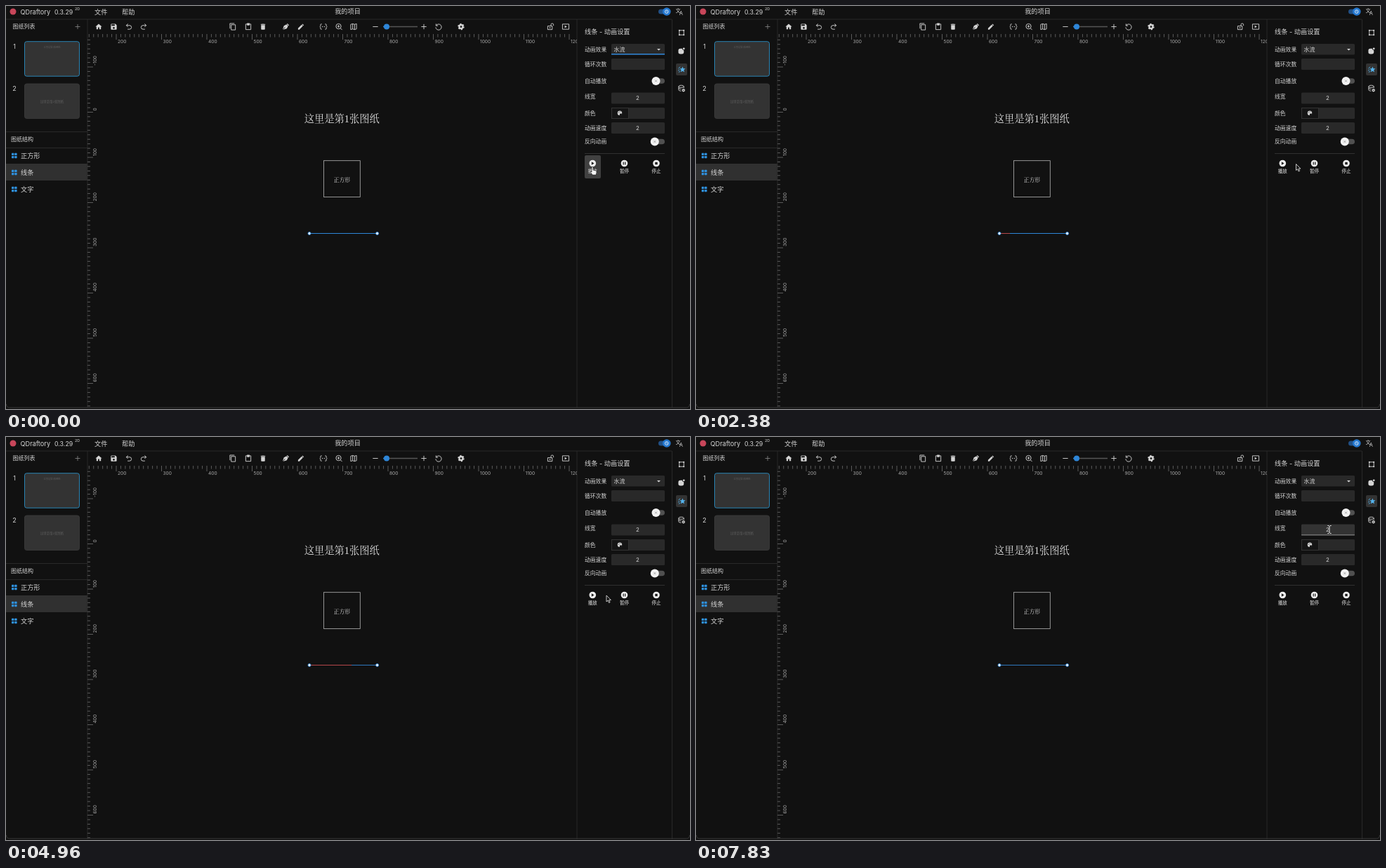
Recreate the animation shown at these times as an HTML page. Size 974 px wide and 575 px high, loop 8 s.

```html
<!DOCTYPE html>
<html lang="zh-CN">
<head>
<meta charset="utf-8">
<title>QDraftory</title>
<style>
html, body { margin: 0; width: 100%; height: 100%; overflow: hidden; background: #111; }
svg { display: block; width: 974px; height: 575px; }
text { font-family: Inter, 'Noto Sans CJK SC', 'Noto Sans CJK', sans-serif; white-space: pre; }
.serif { font-family: 'Liberation Serif', 'Noto Serif CJK SC', 'Noto Sans CJK SC', serif; font-weight: 500; }
</style>
</head>
<body>
<svg id="stage" viewBox="0 0 974 575"></svg>
<script>
const LIGHT = '#d4d4d4', BLUE = '#2e86d8', EDGE = '#292929', FIELD = '#292929';

const text = (s, x, cy, size, fill = LIGHT, anchor = 'start', extra = '') =>
  `<text x="${x}" y="${cy + size * 0.37}" font-size="${size}" fill="${fill}" text-anchor="${anchor}" ${extra}>${s}</text>`;
const rect = (x, y, w, h, fill, extra = '') =>
  `<rect x="${x}" y="${y}" width="${w}" height="${h}" fill="${fill}" ${extra}/>`;
const circle = (x, y, r, fill, extra = '') => `<circle cx="${x}" cy="${y}" r="${r}" fill="${fill}" ${extra}/>`;
const path = (d, stroke, width = 1, extra = '') =>
  `<path d="${d}" fill="none" stroke="${stroke}" stroke-width="${width}" ${extra}/>`;
const solid = (d, fill = LIGHT) => `<path d="${d}" fill="${fill}" fill-rule="evenodd"/>`;

// Icons live in a 24 unit box centred on (x, y)
const icon = (x, y, body, size = 11) =>
  `<g transform="translate(${x - size / 2} ${y - size / 2}) scale(${size / 24})">${body}</g>`;
const line = d => path(d, LIGHT, 2);

function toolbar() {
  const gear = circle(12, 12, 5.5, 'none', `stroke="${LIGHT}" stroke-width="5"`) +
    circle(12, 12, 8.6, 'none', `stroke="${LIGHT}" stroke-width="3.4" stroke-dasharray="4.5 4.5"`);
  const items = [
    [132, solid('M10 20v-6h4v6h5v-8h3L12 3 2 12h3v8z')],
    [153.5, solid('M17 3H5a2 2 0 0 0-2 2v14a2 2 0 0 0 2 2h14a2 2 0 0 0 2-2V7zM12 19a3 3 0 1 1 0-6 3 3 0 0 1 0 6zM15 9H5V5h10z')],
    [175, line('M9 3 4 8l5 5M4 8h10a6 6 0 0 1 0 12H8')],
    [196, line('M15 3l5 5-5 5M20 8H10a6 6 0 0 0 0 12h6')],
    [323, line('M3 18V2h14M7 6h13v16H7z')],
    [345, line('M4 4h16v17H4z') + solid('M8 1h8v7H8z')],
    [366, solid('M6 19a2 2 0 0 0 2 2h8a2 2 0 0 0 2-2V7H6zM19 4h-3.5l-1-1h-5l-1 1H5v2h14z')],
    [398, solid('M3 21l4-12 8-4 5 5-4 8-11 3 6-7-1-1zM16 4l2-2 5 5-2 2z')],
    [420, solid('M3 17v4h4L18 10l-4-4zM21 7l-4-4-2 2 4 4z')],
    [452, line('M7 4H5q-2 0-2 2v4l-2 2 2 2v4q0 2 2 2h2M17 4h2q2 0 2 2v4l2 2-2 2v4q0 2-2 2h-2') +
      circle(9, 12, 1.4, LIGHT) + circle(15, 12, 1.4, LIGHT)],
    [474, circle(11, 11, 8, 'none', `stroke="${LIGHT}" stroke-width="2"`) + line('M17 17l5 5M11 7v8M7 11h8')],
    [495, line('M3 5l6-2 6 2 6-2v16l-6 2-6-2-6 2zM9 3v16M15 5v16')],
    [526, line('M4 12h16')],
    [595, line('M4 12h16M12 4v16')],
    [616, line('M4 9a9 9 0 1 1-1 5M4 3v6h6')],
    [648, gear],
    [775.5, line('M13 10V6a4 4 0 0 1 8 0v3') + line('M3 10h14v11H3z') + circle(10, 15.5, 2, LIGHT)],
    [797, line('M2 4h20v16H2z') + solid('M9 8l7 4-7 4z')]
  ];
  return items.map(([x, body]) => icon(x, 29.5, body)).join('') +
    path('M542 29.5H586', '#555', 1.4) + path('M537 29.5h6', BLUE, 1.4) + circle(542, 29.5, 4, BLUE);
}

function rulers() {
  const step = 6.45, label = '#a8a8a8';
  let ticks = '', labels = '';
  for (let i = -6; i <= 100; i++) {
    const x = 157 + i * step, major = i % 10 === 0;
    if (x > 812) break;
    ticks += `M${x} 40v${major ? 8 : 4.5}`;
    if (major) labels += text(200 + i * 10, x + 2, 50.5, 6.6, label);
  }
  for (let i = -16; i <= 65; i++) {
    const y = 151.5 + i * step, major = i % 10 === 0;
    ticks += `M116 ${y}h${major ? 8 : 4}`;
    if (major) labels += `<g transform="translate(127 ${y - 2}) rotate(-90)">${text(i * 10, 0, 0, 6.6, label)}</g>`;
  }
  return `<svg width="813" height="572">${path(ticks, '#7c7c7c', 0.7)}${labels}</svg>`;
}

function header() {
  return circle(10, 8, 4.5, '#c8465a') +
    text('QDraftory', 20.5, 8.3, 9.2, LIGHT) + text('0.3.29', 69, 8.3, 8.8) + text('2D', 98, 4, 5.4) +
    text('文件', 126, 8.3, 9.2) + text('帮助', 165, 8.3, 9.2) + text('我的项目', 486.5, 7.3, 9.2, LIGHT, 'middle') +
    rect(929, 4.5, 15, 7, '#204f85', 'rx="3.5"') + circle(940.8, 8, 5.8, '#2578d0') +
    circle(940.8, 8, 2.4, 'none', 'stroke="#dcebfa" stroke-width=".9"') +
    path('M940.8 6.2v2l1.3 1', '#dcebfa', 0.7) +
    text('文', 953.5, 6, 7.2) + text('A', 958.8, 10, 7.4) +
    path('M0 19H948', EDGE);
}

function leftPanel() {
  const thumb = (n, y, border, ty) =>
    text(n, 12, y + 7, 9, LIGHT, 'middle') + rect(26.5, y, 78, 49.5, '#333', `rx="3" stroke="${border}" stroke-width=".9"`) +
    text(`这里是第${n}张图纸`, 65.5, ty, n === 1 ? 3.2 : 4.5, '#686868', 'middle', 'class="serif"');
  const row = (name, y) => {
    const tile = (x, dy) => rect(x, y + dy, 3.4, 3.4, '#2f91df', 'rx=".7"');
    return tile(8, -3.8) + tile(12.2, -3.8) + tile(8, 0.4) + tile(12.2, 0.4) + text(name, 21, y, 9.2);
  };
  return text('图纸列表', 9.5, 29.5, 8) + path('M98.5 29.5h7M102 26v7', '#8a8a8a', 0.8) +
    thumb(1, 50.7, '#2a8fc4', 59) + thumb(2, 111, '#3a3a3a', 136.5) +
    path('M0 179.5H116M0 202.5H116', EDGE) + text('图纸结构', 7, 190, 8) +
    rect(0, 225, 116, 24, '#303030') +
    row('正方形', 213.5) + row('线条', 237.5) + row('文字', 261.5);
}

function drawing() {
  return text('这里是第1张图纸', 478.3, 161, 14.3, '#dedede', 'middle', 'class="serif"') +
    rect(452.5, 220.7, 51.8, 51.8, 'none', 'stroke="#b4b4b4" stroke-width=".8"') +
    text('正方形', 478.3, 247.7, 7.8, '#dedede', 'middle', 'class="serif"') +
    '<path id="wire" d="M432 324.5H528.5"/><path id="flow"/>' +
    [432, 528.6].map(x => circle(x, 324.5, 2, '#fff', `stroke="${BLUE}" stroke-width=".9"`)).join('');
}

function rightPanel() {
  const label = (s, y) => text(s, 824, y, 7.8);
  const field = (y, h = 16, id = '') => rect(862, y, 76, h, FIELD, `rx="1.5" ${id && `id="${id}"`}`);
  const toggle = (x, y) => rect(x, y - 3.8, 938 - x, 7.6, '#505050', 'rx="3.8"') + circle(x, y, 6, '#f2f2f2') +
    path(`M${x - 1.5} ${y - 1.5}l3 3m0-3l-3 3`, '#888', 0.7);
  const button = (x, name, mark) => circle(x, 224.5, 4.8, '#eee') +
    `<g transform="translate(${x} 224.5)">${solid(mark, '#151515')}</g>` + text(name, x, 235.5, 6.5, '#eee', 'middle');
  return text('线条 - 动画设置', 824, 37, 9.2) +
    label('动画效果', 62) + field(54, 15.5) + text('水流', 865.5, 62, 8) + solid('M927 61h5l-2.5 2.6z') +
    '<path id="focus" stroke="#2e86d8" stroke-width="1.4"/>' +
    label('循环次数', 83) + field(75) +
    label('自动播放', 107) + toggle(925.5, 107) +
    label('线宽', 129) + field(123.5, 16, 'width') + text('2', 899.5, 131.5, 8, LIGHT, 'middle') +
    label('颜色', 153) + field(145) + rect(862.5, 145.5, 24, 15, '#151515', 'stroke="#333"') +
    circle(874, 152.7, 3.2, '#ddd') + solid('M874 153.5h3.4l-1 2.6h-2.6z', '#151515') +
    [[872.3, 152.5], [873.2, 151], [875.2, 151]].map(p => circle(...p, 0.5, '#151515')).join('') +
    label('动画速度', 174) + field(166, 16, 'speed') + text('2', 899.5, 174, 8, LIGHT, 'middle') +
    '<path id="hover" stroke="#a4a4a4" stroke-width=".8"/>' +
    label('反向动画', 193.5) + toggle(923.8, 193.5) +
    path('M824 210.5H938', '#303030') +
    rect(824, 213, 23, 33, '#414141', 'rx="2" id="pressed"') +
    button(835.3, '播放', 'M-1.4-2.2 2.2 0-1.4 2.2z') +
    button(880.5, '暂停', 'M-1.9-2h1.2v4h-1.2zM.7-2h1.2v4H.7z') +
    button(926, '停止', 'M-1.7-1.7h3.4v3.4h-3.4z');
}

function sideStrip() {
  const corners = [[3, 3], [17, 3], [3, 17], [17, 17]].map(([x, y]) => rect(x, y, 4, 4, LIGHT)).join('');
  return icon(962, 38, line('M5 5h14v14H5z') + corners) +
    icon(962, 64, rect(2, 5, 17, 17, LIGHT, 'rx="6"') + circle(19, 5, 5, '#111') + circle(19, 5, 3, LIGHT)) +
    rect(954, 82, 16, 17, '#333', 'rx="2"') +
    icon(962, 90.5, solid('M15 3l2.5 6 6.5.5-5 4.3 1.6 6.4L15 17l-5.6 3.2 1.6-6.4-5-4.3 6.5-.5z', '#54b4ee') +
      path('M8 4L2 9M6 12l-5 4M8 17l-5 4', '#54b4ee', 2)) +
    icon(962, 117.5, line('M3 6v11c0 2 4 3 8 3M3 11c0 2 4 3 8 3M19 6v5') +
      '<ellipse cx="11" cy="6" rx="8" ry="3.5" fill="none" stroke="#d4d4d4" stroke-width="2"/>' +
      circle(18, 18, 3.2, 'none', `stroke="${LIGHT}" stroke-width="3"`));
}

const stage = document.getElementById('stage');
stage.innerHTML = rect(0, 0, 974, 575, '#111') +
  '<g id="app">' + header() + leftPanel() + path('M116 19V573M813 19V573M948.5 19V573', EDGE) +
  toolbar() + rulers() + drawing() + rightPanel() + sideStrip() + '</g>' +
  path('M.5 568q0 5 5 5H968.5q5 0 5-5', '#383838') +
  '<g id="cursor">' +
  '<path id="arrow" d="M0 0v9l2.1-1.9 1.5 3.4 1.5-.7-1.5-3.2H6.4z" fill="#111" stroke="#eee" stroke-width=".8"/>' +
  '<path id="hand" d="M-1 1q1-2 2 0v4l4 1q1.4.5 1 2l-.8 4H.2L-2.8 8q.5-1.6 1.8 0z" fill="#f4f4f4" stroke="#111" stroke-width=".6"/>' +
  '<path id="beam" d="M-2.6-5.5h1.6l1 1 1-1h1.6M0-4.5v9M-2.6 5.5h1.6l1-1 1 1h1.6" fill="none" stroke="#eee"/></g>';

const $ = id => document.getElementById(id);
const set = (id, attr, value) => $(id).setAttribute(attr, value);
const show = (id, on) => set(id, 'visibility', on ? 'visible' : 'hidden');

// Pointer stops: time, x, y
const route = [
  [0, 835, 229], [360, 835, 229], [720, 858, 231], [1140, 836, 230], [1250, 834, 228], [1420, 834, 226.5],
  [1640, 834, 226.5], [2150, 854.5, 225.5], [3880, 854.5, 225.5], [4000, 855, 226], [4960, 855, 226],
  [5450, 928, 227], [6390, 927, 226], [6800, 905, 176], [6980, 903, 167], [7200, 903, 160], [7830, 902, 132],
  [8000, 902, 132]
];

function pointer(t) {
  const i = route.findIndex(p => p[0] > t), [t0, x0, y0] = route[i - 1], [t1, x1, y1] = route[i];
  const p = (t - t0) / (t1 - t0), e = p * p * (3 - 2 * p);
  return [x0 + (x1 - x0) * e, y0 + (y1 - y0) * e];
}

function draw(now) {
  const t = now % 8000, [x, y] = pointer(t), settled = t >= 2700;
  set('app', 'transform', `translate(0 ${settled ? 1 : 0})`);

  // Red water runs along the wire at 17.5 px/s
  const head = 433 + Math.max(0, t - 1580) * 0.0175;
  set('wire', 'stroke', settled ? '#2f78be' : BLUE);
  set('flow', 'd', `M433 324.5H${head}`);
  set('flow', 'stroke', '#b5474a');
  show('flow', t > 1580 && t < 6950);

  const half = 38 * (1 - Math.min(1, Math.max(0, (t - 1420) / 300))) ** 2.4;
  set('focus', 'd', `M${900 - half} 68.8H${900 + half}`);
  show('focus', half > 0);
  show('pressed', t < 2050);

  const onSpeed = y > 165 && y < 184, onWidth = y < 141;
  set('speed', 'fill', onSpeed ? '#333' : FIELD);
  set('width', 'fill', onWidth ? '#333' : FIELD);
  set('hover', 'd', `M862 ${onSpeed ? 181.5 : 138.8}H938`);
  show('hover', onSpeed || onWidth);

  const beam = y < 184, hand = !beam && (x < 847 || x > 916);
  set('cursor', 'transform', `translate(${x} ${y})`);
  show('beam', beam);
  show('hand', hand);
  show('arrow', !beam && !hand);
}

function loop() {
  draw(performance.now());
  requestAnimationFrame(loop);
}
loop();
</script>
</body>
</html>
```
